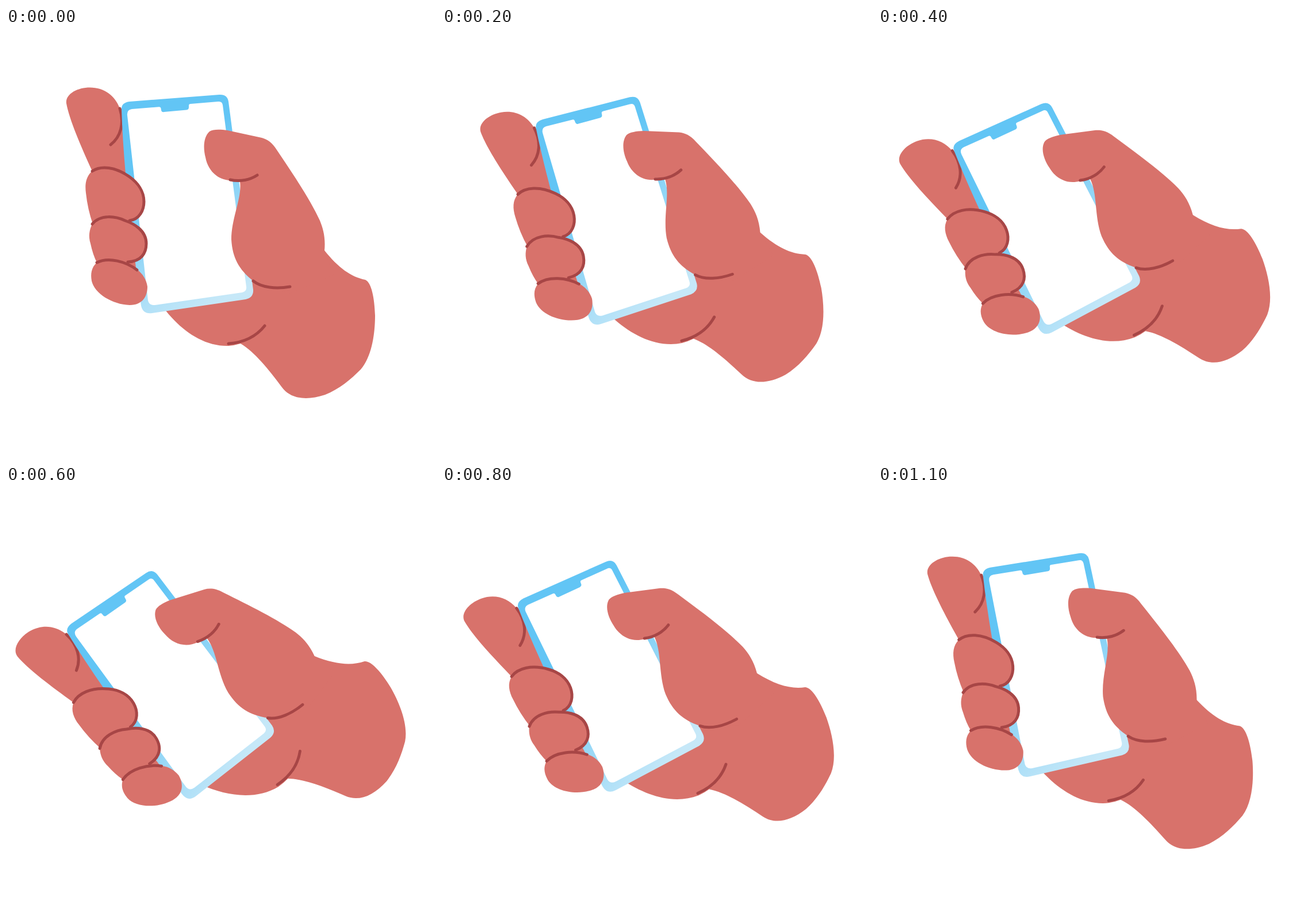
An HTML page for the animation above (1.2 s loop, 748 by 748 pixels).

```html
<!DOCTYPE html>
<html lang="en">
<head>
<meta charset="utf-8">
<title>Hand tilting a phone</title>
<style>
  html, body { margin: 0; width: 100%; height: 100%; overflow: hidden; background: #fff; }
  svg { display: block; width: 100%; height: 100%; }
  .skin { fill: #d8726b; }
  .crease { fill: none; stroke: #a74646; stroke-width: 5; stroke-linecap: round; stroke-linejoin: round; }
</style>
</head>
<body>
<svg viewBox="0 0 748 748">
  <defs>
    <linearGradient id="frame" gradientUnits="userSpaceOnUse" x1="250" y1="234" x2="390" y2="465">
      <stop offset="0" stop-color="#62c5f5"/>
      <stop offset="1" stop-color="#c6e8f8"/>
    </linearGradient>
  </defs>
  <g id="tilt">
    <!-- index finger, palm and wrist behind the phone -->
    <g class="skin">
      <path d="M150 249C130 205 110 159 105 131C103 115 124 103.500 146 103.500C171 103.500 190 118 198 140C202 148 203 158 204 168L240 200V430L212 420L200 330L160 275Z"/>
      <path d="M272 484C300 522 340 554 387 553Q398 552 408 549C432 563 456 593 480 625C495 645 522 649 555 638C580 628 600 611 617 594C637 571 642 530 642 500C641 470 636 443 625 438C600 433 578 417 554 387L440 380L400 440Z"/>
    </g>
    <path class="crease" d="M198 140C206 165 200 189 182 203M387 549C415 547 435 537 450 518"/>

    <!-- phone -->
    <path fill="url(#frame)" d="M215 128L371 116Q385 115 387 128L430 455Q431 469 417 472L254 496Q238 498 235 483Q205 270 201 142Q200 130 215 128Z"/>
    <path fill="#fff" d="M219 141L266 137.300Q269 137 269.500 140L270 143Q271 147 275 146L314 142.500Q318 142 318 138V135Q318 132 321 132L369 128Q376 127 377 134L418 450Q419 458 411 460L259 482Q249 483 247 474L211 152Q210 142 219 141Z"/>

    <!-- curled fingers -->
    <path class="skin" d="M150 249C139 258 137 272 139 287Q142 315 151 341L215 336C232 333 240 317 240 302C240 284 229 269 215 259C190 241 165 239 150 249Z"/>
    <path class="crease" d="M150 249C165 239 190 241 215 259C229 269 240 284 240 302C240 317 232 333 215 335"/>
    <path class="skin" d="M150 341C145 351 143 362 147 375Q151 394 158 408L212 409C235 407 244 392 244 375C244 352 222 340 207 335C190 327 164 324 150 341Z"/>
    <path class="crease" d="M150 341C164 324 190 327 207 335C222 340 244 352 244 375C244 392 235 406 212 407"/>
    <path class="skin" d="M158 408C148 417 147 428 149 440C154 462 185 481 215 482C238 482 246 466 246 450C244 437 238 428 228 420C208 404 178 398 158 408Z"/>
    <path class="crease" d="M158 408C178 398 209 406 228 421"/>

    <!-- thumb -->
    <path class="skin" d="M554 387C556 365 552 350 546 335C530 300 500 255 471 212C463 199 455 194 445 191L385 178C372 176 360 176 354 180C343 190 343 210 347 225C351 247 367 264 390 265L407 267C411 295 392 330 392 368C394 400 405 420 430 440L494 462L570 430Z"/>
    <path class="crease" d="M390 264C408 268 425 264 437 256M430 440C445 452 470 454 494 450"/>
  </g>
</svg>
<script>
  const STEP = 100;
  // Tilt in degrees for each step: a steady swing out and back.
  const angles = [0, 4.95, 9.9, 14.85, 19.8, 24.75, 29.75, 24.6, 19.6, 14.6, 9.65, 4.65];
  const tilt = document.getElementById("tilt");
  const start = performance.now();

  function draw(now) {
    const step = Math.floor(Math.max(0, now - start) / STEP) % angles.length;
    tilt.setAttribute("transform", `rotate(${-angles[step]} 374 374)`);
    requestAnimationFrame(draw);
  }
  draw(start);
</script>
</body>
</html>
```
